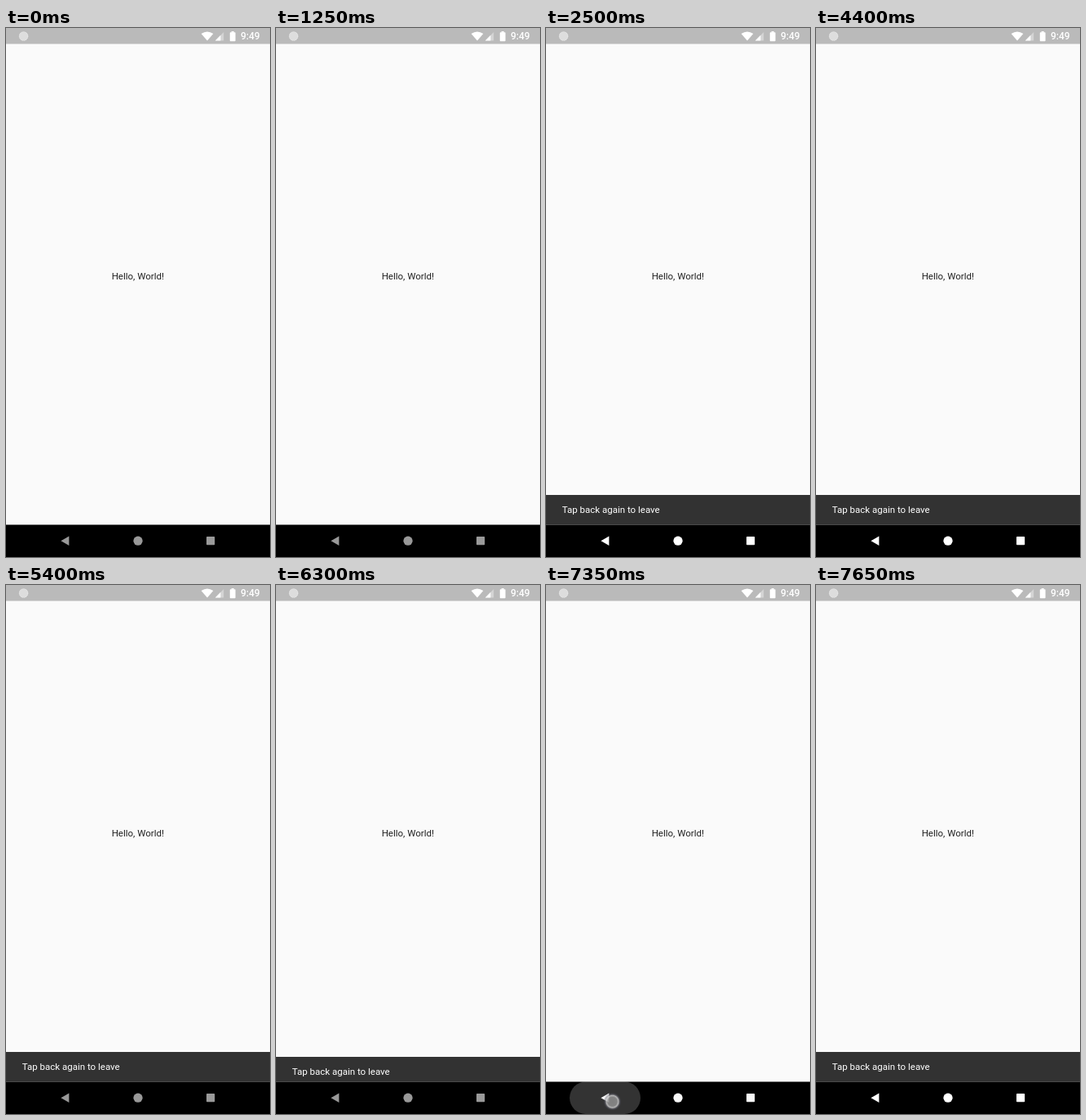
Animation of 324 by 648 pixels, one loop 8000 ms. Source, as an HTML page with a canvas:

```html
<!DOCTYPE html>
<html lang="en">
<head>
<meta charset="utf-8">
<title>Tap back again to leave</title>
<style>
  html, body { margin: 0; width: 100%; height: 100%; overflow: hidden; background: #fafafa; }
  canvas { display: block; width: 324px; height: 648px; }
</style>
</head>
<body>
<canvas id="stage"></canvas>
<script>
const W = 324, H = 648, LOOP = 8000;
const STATUS_H = 19.5, NAV_Y = 608.5, NAV_MID = 628, BAR_H = 36.5;
const canvas = document.getElementById('stage');
const ctx = canvas.getContext('2d');
const dpr = window.devicePixelRatio || 1;
canvas.width = W * dpr;
canvas.height = H * dpr;
ctx.scale(dpr, dpr);

// Each tap: finger down, finger up
const taps = [{ down: 1750, up: 1912 }, { down: 7100, up: 7405 }];
const BAR_MS = 250, BAR_OUT = 6190, BAR_GONE = 6400;

const clamp = v => Math.max(0, Math.min(1, v));
const ramp = (t, start, ms) => clamp((t - start) / ms);
const easeOut = p => 1 - (1 - p) ** 3;

// cubic-bezier(.4, 0, .2, 1)
function fastOutSlowIn(x) {
  let lo = 0, hi = 1, s = 0.5;
  for (let i = 0; i < 24; i++) {
    s = (lo + hi) / 2;
    const bx = 1.2 * s * (1 - s) ** 2 + 0.6 * s * s * (1 - s) + s ** 3;
    if (bx < x) lo = s; else hi = s;
  }
  return x <= 0 ? 0 : x >= 1 ? 1 : 3 * s * s * (1 - s) + s ** 3;
}

function rect(x, y, w, h, color, r = 0) {
  ctx.fillStyle = color;
  ctx.beginPath();
  ctx.roundRect(x, y, w, h, r);
  ctx.fill();
}

function disc(x, y, r, color) {
  ctx.fillStyle = color;
  ctx.beginPath();
  ctx.arc(x, y, r, 0, Math.PI * 2);
  ctx.fill();
}

function poly(points, color) {
  ctx.fillStyle = color;
  ctx.beginPath();
  for (const [x, y] of points) ctx.lineTo(x, y);
  ctx.closePath();
  ctx.fill();
}

function label(str, x, y, color, font = '11.5px', align = 'left') {
  ctx.font = font + ' Roboto, sans-serif';
  ctx.textAlign = align;
  ctx.fillStyle = color;
  ctx.fillText(str, x, y);
}

function drawStatus() {
  rect(0, 0, W, STATUS_H, '#bababa');

  disc(21.6, 10, 5.6, 'rgba(255,255,255,.5)');
  ctx.strokeStyle = 'rgba(255,255,255,.45)';
  ctx.lineWidth = 1;
  ctx.setLineDash([1.2, 1]);
  ctx.beginPath();
  ctx.arc(21.6, 10, 5.3, 0, Math.PI * 2);
  ctx.stroke();
  ctx.setLineDash([]);

  // Wi-Fi fan
  ctx.fillStyle = '#fff';
  ctx.beginPath();
  ctx.moveTo(247, 15.6);
  ctx.lineTo(239.6, 6.9);
  ctx.quadraticCurveTo(247, 1.9, 254.4, 6.9);
  ctx.closePath();
  ctx.fill();

  // Signal wedge, partly filled
  poly([[256.8, 15.4], [267.2, 15.4], [267.2, 5]], 'rgba(255,255,255,.38)');
  poly([[256.8, 15.4], [263.4, 15.4], [263.4, 8.8]], '#fff');

  rect(274.8, 5.2, 6.8, 11, '#fff', 0.8);
  rect(276.7, 4, 3, 1.6, '#fff');
  label('9:49', 288, 14.3, '#fff', '500 12px');
}

function barHeight(t) {
  const [a, b] = taps;
  if (t >= b.up) return BAR_H * fastOutSlowIn(ramp(t, b.up, BAR_MS));
  if (t >= BAR_GONE) return 0;
  if (t >= BAR_OUT) return BAR_H * fastOutSlowIn(1 - ramp(t, BAR_OUT, BAR_MS));
  return BAR_H * fastOutSlowIn(ramp(t, a.up, BAR_MS));
}

function drawBar(t) {
  const h = barHeight(t);
  if (h <= 0) return;
  const y = NAV_Y - h;
  rect(0, y, W, h, '#323232');
  label('Tap back again to leave', 19.8, y + 22.2, '#fff');
}

// Nav icons brighten after a tap and dim again later
function iconColor(t) {
  const [a, b] = taps;
  const glow = ramp(t, a.down + 50, 215) - ramp(t, 4400, 850) + ramp(t, b.down + 50, 215);
  const v = Math.round(153 + 102 * clamp(glow));
  return `rgb(${v},${v},${v})`;
}

function drawRipple(t, { down, up }) {
  if (t < down || t > up + 240) return;
  const half = 43.5 * easeOut(ramp(t, down, 200));
  const alpha = 0.2 * (1 - ramp(t, up, 240));
  rect(72.5 - half, NAV_Y, half * 2, H - NAV_Y, `rgba(255,255,255,${alpha})`, Math.min(half, 19.7));
}

function drawTouch(t, { down, up }) {
  const alpha = t < down ? 0 : 1 - ramp(t, up - 20, 140);
  if (!alpha) return;
  const x = 81.5, y = 632.8, r = 11;
  const g = ctx.createRadialGradient(x, y, 0, x, y, r);
  g.addColorStop(0, 'rgba(140,140,140,.85)');
  g.addColorStop(0.5, 'rgba(145,145,145,.85)');
  g.addColorStop(0.68, 'rgba(205,205,205,.85)');
  g.addColorStop(0.82, 'rgba(110,110,120,.5)');
  g.addColorStop(1, 'rgba(60,60,80,0)');
  ctx.globalAlpha = alpha;
  disc(x, y, r, g);
  ctx.globalAlpha = 1;
}

function drawNav(t) {
  rect(0, NAV_Y, W, H - NAV_Y, '#000');
  for (const tap of taps) drawRipple(t, tap);
  const color = iconColor(t);
  poly([[67.4, NAV_MID + 0.2], [77.4, 622.5], [77.4, 633.9]], color);
  disc(162, NAV_MID + 0.2, 5.6, color);
  rect(246, 623.1, 10.2, 10.2, color, 0.8);
  for (const tap of taps) drawTouch(t, tap);
}

function draw(t) {
  rect(0, 0, W, H, '#fafafa');
  drawStatus();
  label('Hello, World!', 161.8, 308.2, '#202020', '11.5px', 'center');
  drawBar(t);
  drawNav(t);
}

const start = performance.now();
function tick() {
  draw((performance.now() - start) % LOOP);
  requestAnimationFrame(tick);
}
tick();
</script>
</body>
</html>
```
